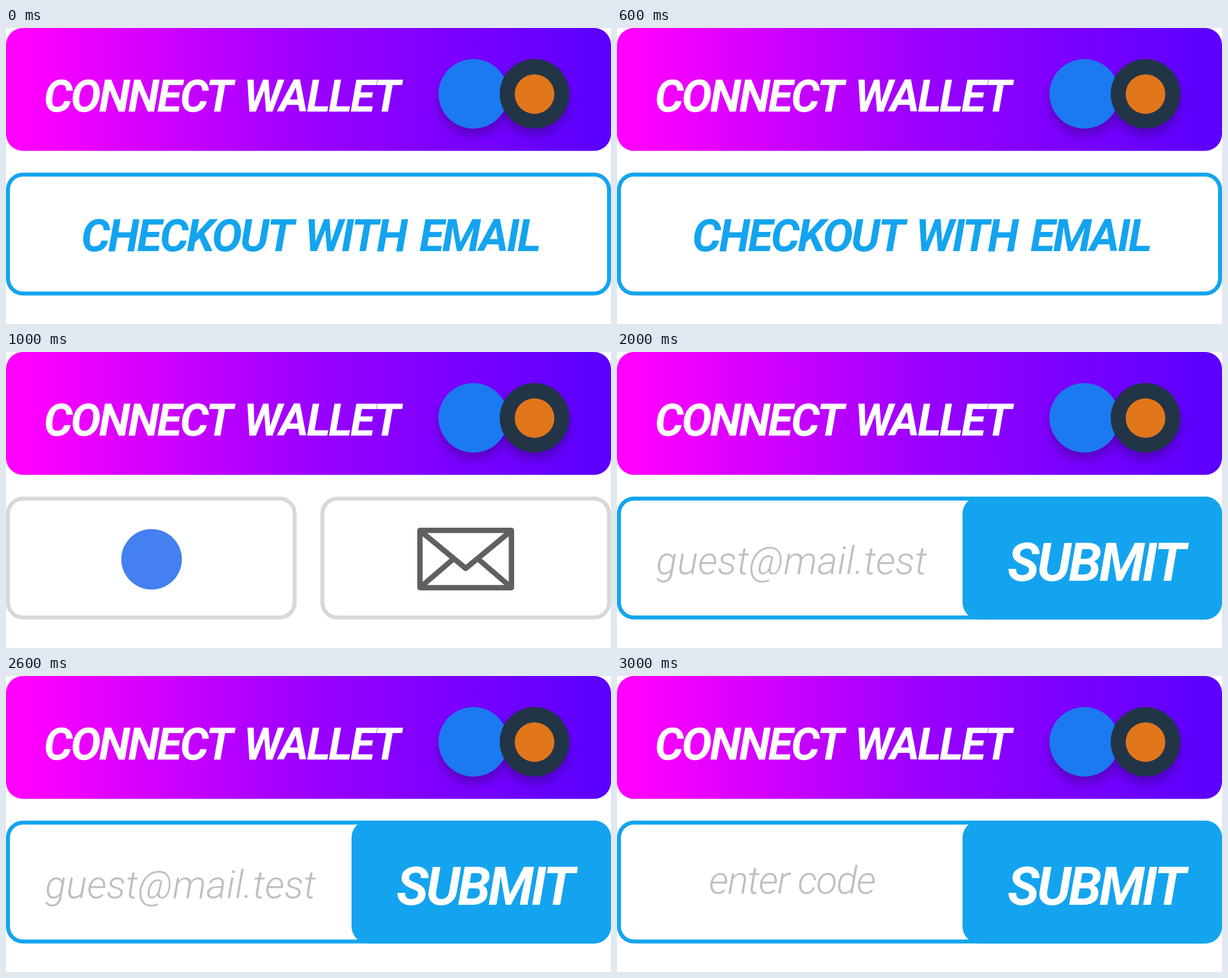
These frames come from a looping animation (1068 by 524 pixels, 4000 ms). An HTML page:

```html
<!DOCTYPE html>
<html lang="en">
<head>
<meta charset="utf-8">
<title>Checkout buttons</title>
<style>
html, body { margin: 0; width: 100%; height: 100%; overflow: hidden; background: #fff; }
svg { display: block; width: 100%; height: 100%; }
text { font-family: Roboto, "Open Sans", sans-serif; font-style: italic; text-anchor: middle; }
.label { font-weight: 700; font-size: 80px; letter-spacing: -.044em; word-spacing: .1em; fill: #fff; }
.big { font-size: 94px; }
.hint { font-weight: 350; font-size: 69px; fill: #bfbfbf; }
.tight { letter-spacing: -.025em; }
.box { fill: #fff; stroke-width: 7; }
.blue { stroke: #14a4ef; }
.grey { stroke: #d8d8d8; }
.mail { fill: none; stroke: #606060; stroke-width: 9.5; stroke-linejoin: round; }
.step { display: none; }
.step.on { display: inline; }
</style>
</head>
<body>
<svg viewBox="0 0 1068 524">
  <defs>
    <linearGradient id="fade" gradientUnits="userSpaceOnUse" x1="36" x2="1046" y1="0" y2="0">
      <stop stop-color="#f0f"/>
      <stop offset=".5" stop-color="#9a00ff"/>
      <stop offset="1" stop-color="#5c00ff"/>
    </linearGradient>
    <filter id="shadow" x="-30%" y="-30%" width="160%" height="180%">
      <feDropShadow dx="0" dy="12" stdDeviation="9" flood-opacity=".25"/>
    </filter>
  </defs>

  <rect width="1068" height="217.5" rx="30" fill="url(#fade)"/>
  <text class="label" x="380" y="147.5">CONNECT WALLET</text>
  <g filter="url(#shadow)">
    <circle cx="825" cy="116.5" r="61.5" fill="#1a7af0"/>
    <circle cx="933" cy="116.5" r="61.5" fill="#233447"/>
  </g>
  <circle cx="933" cy="117" r="35" fill="#e2761b"/>

  <g class="step">
    <rect class="box blue" x="3.5" y="259.5" width="1061" height="210.5" rx="26.5"/>
    <text class="label" x="537" y="395" style="fill:#14a4ef">CHECKOUT WITH EMAIL</text>
  </g>

  <g class="step">
    <rect class="box grey" x="3.5" y="259.5" width="506" height="210.5" rx="26.5"/>
    <rect class="box grey" x="558.5" y="259.5" width="506" height="210.5" rx="26.5"/>
    <circle cx="257" cy="367" r="53.5" fill="#4480ef"/>
    <g class="mail">
      <rect x="730.75" y="315.75" width="161.5" height="101.5"/>
      <path d="M733 318L811.5 383L890 318M732 416L789 367M891 416L834 367"/>
    </g>
  </g>

  <!-- shared by the last two steps -->
  <g class="step" data-last="3">
    <rect class="box blue" x="3.5" y="259.5" width="1061" height="210.5" rx="26.5"/>
    <rect x="610" y="256" width="458" height="217.5" rx="30" fill="#14a4ef"/>
    <text class="label big" x="845" y="404.5">SUBMIT</text>
  </g>
  <text class="hint step" data-first="2" x="308" y="393">guest@mail.test</text>
  <text class="hint tight step" data-first="3" x="309" y="385">enter code</text>
</svg>
<script>
const STEP = 1000, COUNT = 4;
const parts = [...document.querySelectorAll(".step")].map((el, i) => {
  const first = +(el.dataset.first ?? i);
  return { el, first, last: +(el.dataset.last ?? first) };
});

function draw() {
  const now = Math.floor(performance.now() / STEP) % COUNT;
  for (const { el, first, last } of parts)
    el.classList.toggle("on", now >= first && now <= last);
  requestAnimationFrame(draw);
}
draw();
</script>
</body>
</html>
```
